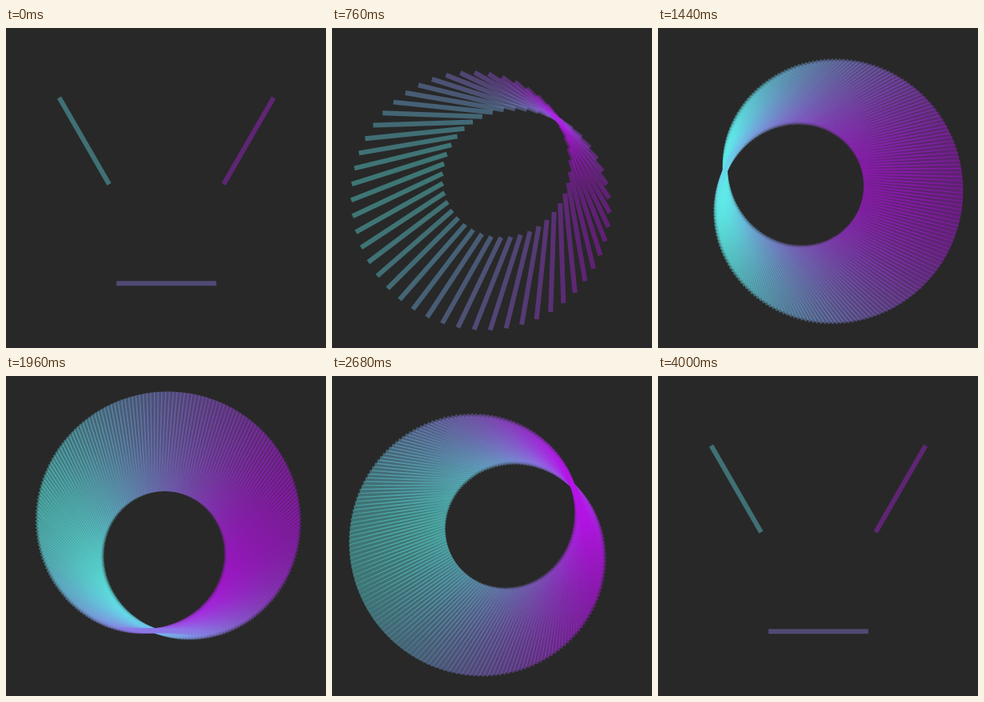
An HTML page with a canvas that plays this animation: 400x400 px, repeating every 4.04 s.

```html
<!DOCTYPE html>
<html lang="en">
<head>
<meta charset="utf-8">
<title>Twisting ring</title>
<style>
  html, body { margin: 0; width: 100%; height: 100%; overflow: hidden; background: #282828; }
  canvas { display: block; width: 400px; height: 400px; }
</style>
</head>
<body>
<canvas id="stage" width="400" height="400"></canvas>
<script>
const ctx = document.getElementById('stage').getContext('2d');
const TAU = Math.PI * 2;
const STEP = 40, STEPS = 101;
const CENTER = 200.5, RADIUS = 118.7, HALF = 62.4;
const MIN = 3, MAX = 200;
const TEAL = [95, 235, 232], PURPLE = [180, 20, 230];

const easeInOut = p => p < 0.5 ? 4 * p ** 3 : 1 - 4 * (1 - p) ** 3;

function mix(t) {
  const rgb = TEAL.map((c, i) => Math.round(c + (PURPLE[i] - c) * t));
  return `rgba(${rgb.join(',')},0.4)`;
}

function draw(step) {
  const p = step / (STEPS - 1);
  const grow = easeInOut(1 - Math.abs(2 * p - 1));
  const count = Math.floor(MIN + (MAX - MIN) * grow + 1e-6);

  ctx.fillStyle = '#282828';
  ctx.fillRect(0, 0, 400, 400);
  ctx.fillStyle = '#2a262a';
  ctx.fillRect(0, 398, 400, 2);

  ctx.lineWidth = 6;
  for (let i = 0; i < count; i++) {
    const turn = TAU * i / count;
    const tilt = turn / 2 - TAU * p; // half a twist around the ring
    const x = CENTER - RADIUS * Math.sin(turn);
    const y = CENTER + RADIUS * Math.cos(turn);
    const dx = HALF * Math.cos(tilt), dy = HALF * Math.sin(tilt);
    ctx.strokeStyle = mix((1 - Math.sin(turn)) / 2);
    ctx.beginPath();
    ctx.moveTo(x - dx, y - dy);
    ctx.lineTo(x + dx, y + dy);
    ctx.stroke();
  }
}

const start = performance.now();
function tick() {
  const elapsed = Math.max(0, performance.now() - start);
  draw(Math.floor(elapsed / STEP) % STEPS);
  requestAnimationFrame(tick);
}
tick();
</script>
</body>
</html>
```
